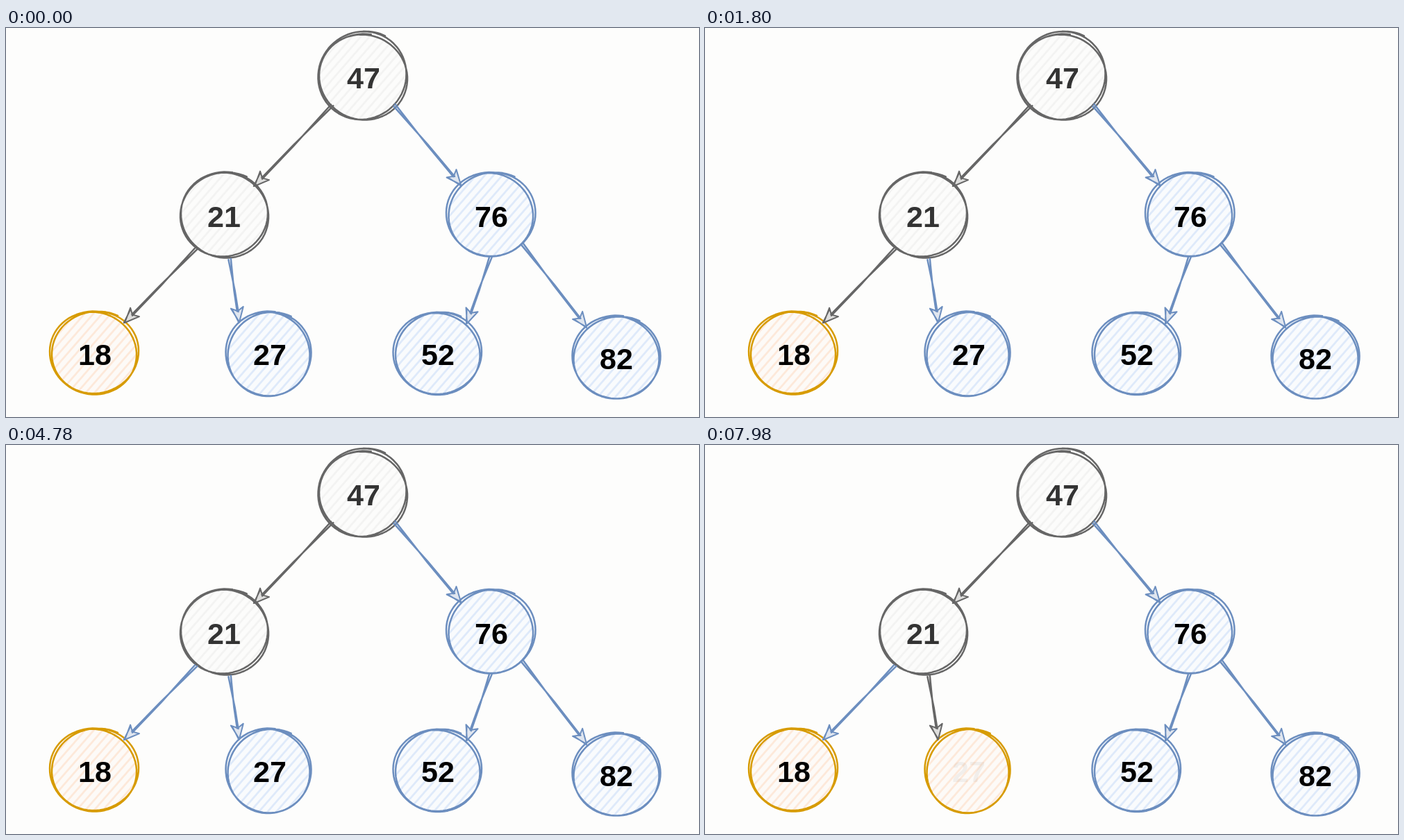
Write an HTML page that moves like this. It is 998 px wide and 561 px high and loops after 8000 ms.

```html
<!DOCTYPE html>
<html lang="en">
<head>
<meta charset="utf-8">
<title>Tree traversal</title>
<style>
  html, body { margin: 0; width: 100%; height: 100%; overflow: hidden; background: #fdfdfc; }
  svg { display: block; width: 100vw; height: 100vh; }
  path { fill: none; stroke-width: 2.5; stroke-linecap: round; stroke-linejoin: round; }
  text { font: bold 43px "Liberation Sans", Arial, sans-serif; text-anchor: middle; }
</style>
</head>
<body>
<svg id="stage" viewBox="0 0 998 561"><defs id="defs"></defs></svg>
<script>
const LOOP = 8000;
const TEXT_FADE = 800;
const palettes = {
  dark:   { stroke: '#666666', base: '#fcfcfb', hatch: '#f3f3f2', text: '#333333' },
  blue:   { stroke: '#6c8ebf', base: '#f9fbfd', hatch: '#dde9fa', text: '#000000' },
  orange: { stroke: '#d79b00', base: '#fdfaf7', hatch: '#fde8d8', text: '#000000' }
};

// Each loop is [cx, cy, rx, ry]; steps are [time, palette].
const nodes = [
  { label: '47', x: 515, y: 86.5, loops: [[514.5, 71, 63.5, 61.5], [513, 68.5, 63.5, 63.5]], steps: [[0, 'dark']] },
  { label: '21', x: 314, y: 286.5, loops: [[315, 270, 63, 61.5], [314, 269, 63, 60.5]], steps: [[0, 'dark']] },
  { label: '76', x: 699, y: 286.5, loops: [[696.5, 269, 62.5, 60], [700, 269, 62.5, 60.5]], steps: [[0, 'blue']] },
  { label: '18', x: 128, y: 485.5, loops: [[125.5, 469, 62.5, 59.5], [128.5, 468, 62.5, 59]], steps: [[0, 'orange']] },
  { label: '27', x: 380, y: 485.5, loops: [[377, 470, 60.5, 60.5], [379.5, 470.5, 60, 60.5]],
    steps: [[0, 'blue'], [5060, 'dark'], [7880, 'orange']] },
  { label: '52', x: 622, y: 485.5, loops: [[620, 470, 62.5, 59], [623, 469, 62, 59]], steps: [[0, 'blue']] },
  { label: '82', x: 879, y: 491.5, loops: [[878, 475, 62.5, 59.5], [880, 475.5, 62.5, 59]], steps: [[0, 'blue']] }
];

const arrows = [
  { line: [470, 111, 358, 228], steps: [[0, 'dark']] },
  { line: [559, 111, 655, 226], steps: [[0, 'blue']] },
  { line: [274, 318, 171, 425], steps: [[0, 'dark'], [4220, 'blue']] },
  { line: [322, 333, 336, 424], steps: [[0, 'blue'], [5060, 'dark']] },
  { line: [698, 330, 664, 426], steps: [[0, 'blue']] },
  { line: [743, 311, 836, 431], steps: [[0, 'blue']] }
];

const stage = document.getElementById('stage');
const defs = document.getElementById('defs');

function add(parent, tag, attrs) {
  const el = document.createElementNS('http://www.w3.org/2000/svg', tag);
  for (const key in attrs) el.setAttribute(key, attrs[key]);
  return parent.appendChild(el);
}

const pathThrough = points => 'M' + points.map(p => p.map(v => v.toFixed(1)).join(' ')).join('L');

// A hand-drawn ellipse, bulging along one diagonal, that overshoots its own start.
function sketchLoop([cx, cy, rx, ry], start, bulge) {
  const points = [];
  for (let i = 0; i <= 72; i++) {
    const turn = i / 72 * 1.08;
    const a = start + turn * 2 * Math.PI;
    const k = 1 + bulge * Math.sin(2 * a) + 0.3 * Math.max(0, turn - 1);
    points.push([cx + rx * k * Math.cos(a), cy + ry * k * Math.sin(a)]);
  }
  return pathThrough(points);
}

function sketchArrow([x1, y1, x2, y2]) {
  const length = Math.hypot(x2 - x1, y2 - y1);
  const ux = (x2 - x1) / length, uy = (y2 - y1) / length;
  const at = (along, side) => [x1 + ux * along - uy * side, y1 + uy * along + ux * side];
  const notch = length - 16;
  return {
    shaft: pathThrough([at(0, -1.8), at(length / 2, 0.6), at(notch, 0.8)]) +
           pathThrough([at(1, 1.8), at(length / 2, -0.6), at(notch + 1, -0.8)]),
    head: pathThrough([at(length, 0), at(length - 21, 9), at(notch, 0), at(length - 21, -9), at(length, 0)]) +
          pathThrough([at(length + 1, 0.8), at(length - 20, 7.5)])
  };
}

for (const [name, p] of Object.entries(palettes)) {
  const pattern = add(defs, 'pattern', { id: name, width: 9.5, height: 9.5,
    patternUnits: 'userSpaceOnUse', patternTransform: 'rotate(41)' });
  add(pattern, 'rect', { width: 9.5, height: 9.5, fill: p.base });
  add(pattern, 'rect', { x: 3, width: 2.6, height: 9.5, fill: p.hatch });
}

for (const node of nodes) {
  const [a, b] = node.loops;
  node.body = add(stage, 'ellipse', { cx: (a[0] + b[0]) / 2, cy: (a[1] + b[1]) / 2, rx: a[2], ry: a[3] });
  node.outline = add(stage, 'path', { d: sketchLoop(a, -1.9, 0.018) + sketchLoop(b, -1.55, -0.018) });
  node.text = add(stage, 'text', { x: node.x, y: node.y });
  node.text.textContent = node.label;
}

for (const arrow of arrows) {
  const { shaft, head } = sketchArrow(arrow.line);
  arrow.shaft = add(stage, 'path', { d: shaft });
  arrow.head = add(stage, 'path', { d: head, style: 'fill-opacity: .2; stroke-width: 2' });
}

const currentStep = (steps, t) => steps.filter(([time]) => time <= t).pop();

function render(t) {
  for (const node of nodes) {
    const [since, name] = currentStep(node.steps, t);
    const p = palettes[name];
    node.body.setAttribute('fill', `url(#${name})`);
    node.outline.setAttribute('stroke', p.stroke);
    node.text.setAttribute('fill', p.text);
    const fade = Math.min(1, (t - since) / TEXT_FADE);
    node.text.setAttribute('opacity', since ? fade * fade * (3 - 2 * fade) : 1);
  }
  for (const arrow of arrows) {
    const { stroke } = palettes[currentStep(arrow.steps, t)[1]];
    arrow.shaft.setAttribute('stroke', stroke);
    arrow.head.setAttribute('stroke', stroke);
    arrow.head.style.fill = stroke;
  }
}

const origin = performance.now();
function tick() {
  render((performance.now() - origin) % LOOP);
  requestAnimationFrame(tick);
}
render(0);
requestAnimationFrame(tick);
</script>
</body>
</html>
```
